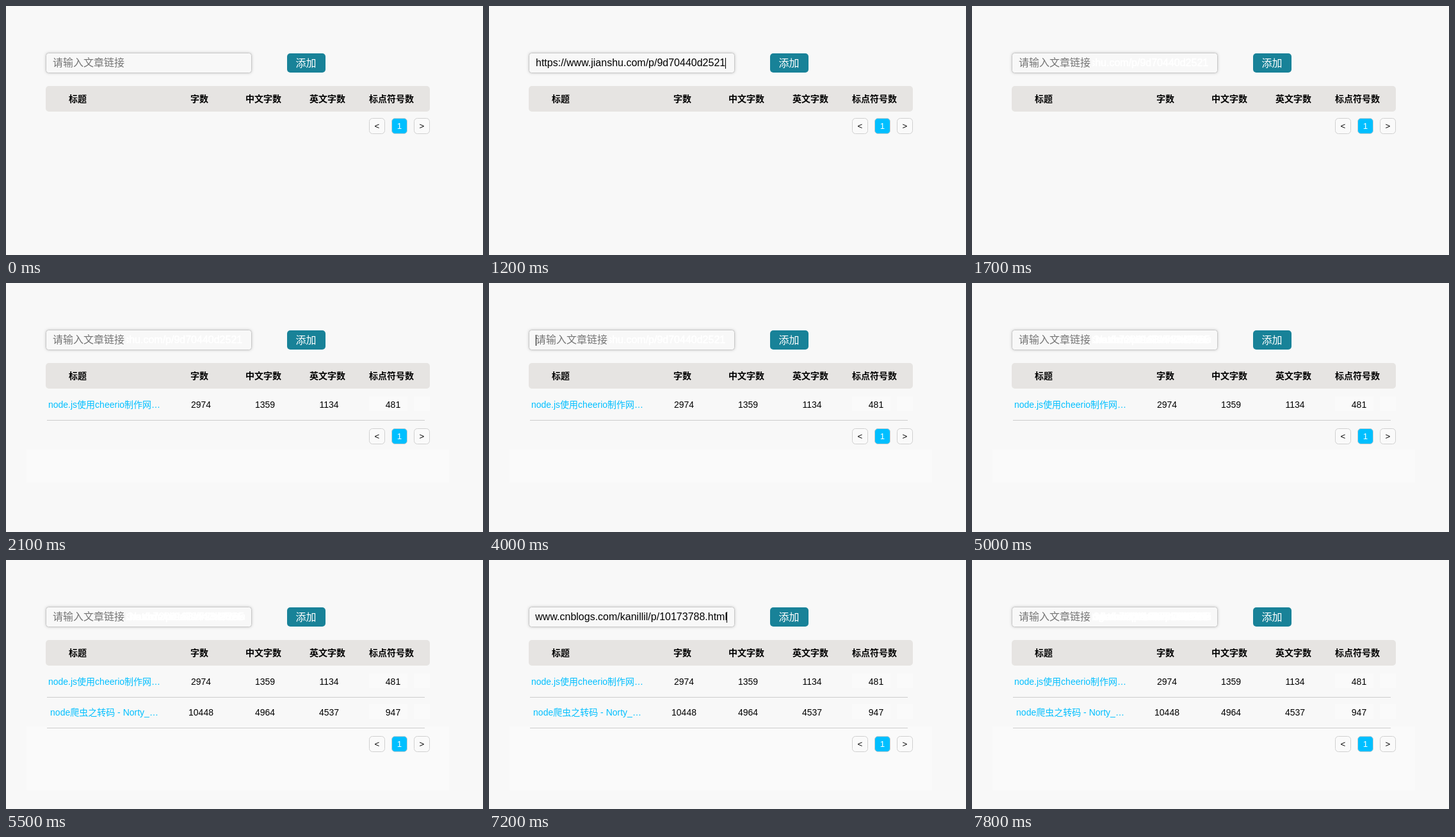
Animation of 745x389 px, one loop 8 s. Source, as an HTML page:

```html
<!DOCTYPE html>
<html lang="zh-CN">
<head>
<meta charset="utf-8">
<title>文章字数统计</title>
<style>
  html, body { margin: 0; width: 100%; height: 100%; overflow: hidden; background: #f8f8f8; }
  svg { display: block; width: 745px; height: 389px; }
  text { font-family: "Liberation Sans", Arial, "Noto Sans CJK SC", "Noto Sans CJK", sans-serif; font-size: 14px; white-space: pre; }
  .mid { text-anchor: middle; }
  .head { font-weight: bold; }
  .big { font-size: 16px; }
  .small { font-size: 13.33px; }
  .link { fill: #00bfff; }
  .ghost { fill: #fff; stroke: #fff; stroke-width: .7; }
  .field { filter: drop-shadow(0 0 2px rgba(0, 0, 0, .18)); }
</style>
</head>
<body>
<svg id="stage" viewBox="0 0 745 389">
  <defs>
    <clipPath id="inner"><rect x="72" y="76" width="301" height="26"/></clipPath>
    <clipPath id="tail"><rect x="188" y="76" width="185" height="26"/></clipPath>
  </defs>
</svg>
<script>
const LOOP = 8000;
const stage = document.getElementById('stage');

function add(parent, tag, attrs, content) {
  const el = document.createElementNS('http://www.w3.org/2000/svg', tag);
  for (const key in attrs) el.setAttribute(key, attrs[key]);
  if (content) el.textContent = content;
  parent.appendChild(el);
  return el;
}
const box = (parent, x, y, width, height, fill, more) =>
  add(parent, 'rect', { x, y, width, height, fill, ...more });
const label = (parent, x, y, cls, content, more) =>
  add(parent, 'text', { x, y, class: cls, ...more }, content);
const show = (el, on) => { el.style.display = on ? '' : 'none'; };

// start: pasted, blur: focus lost and scrolled home, end: cleared
const entries = [
  { url: 'https://www.jianshu.com/p/9d70440d2521', start: 1200, blur: 1600, end: 1700, caret: 369, fits: true },
  { url: 'https://blog.csdn.net/h7206183/article/details/72849265', start: 4200, blur: 4900, end: 5000, caret: 371 },
  { url: 'https://www.cnblogs.com/kanillil/p/10173788.html', start: 7200, blur: 7700, end: 7800, caret: 371 }
];
const rows = [
  { at: 2100, cells: ['node.js使用cheerio制作网…', '2974', '1359', '1134', '481'] },
  { at: 5500, cells: ['node爬虫之转码 - Norty_…', '10448', '4964', '4537', '947'] }
];
const carets = [[500, 1000], [4000, 4200], [7000, 7200]];
const columns = [153.5, 304.5, 404.5, 504.5, 604.5];

const panel = box(stage, 32, 260, 660, 52, '#fafafa');

// Link field
box(stage, 62.5, 73.5, 321, 31, '#f8f8f8', { rx: 4, stroke: '#c8c8c8', class: 'field' });
const ghosts = add(stage, 'g', { 'clip-path': 'url(#tail)' });
const hint = label(stage, 73, 94, 'big', '请输入文章链接', { fill: '#757575' });
const values = add(stage, 'g', { 'clip-path': 'url(#inner)' });
const caret = box(stage, 73, 81, 1, 17, '#000');

function place(parent, entry, home, cls) {
  const left = home || entry.fits;
  return label(parent, left ? 73 : 372, 94, cls, entry.url, { 'text-anchor': left ? 'start' : 'end' });
}
for (const e of entries) {
  e.active = place(values, e, false, 'big');
  e.idle = place(values, e, true, 'big');
  e.trace = add(ghosts, 'g', {});
  place(e.trace, e, false, 'big ghost');
  if (!e.fits) place(e.trace, e, true, 'big ghost');
}

// Button and table head
box(stage, 439, 74, 60, 30, '#188298', { rx: 5 });
label(stage, 468.5, 95, 'mid big', '添加', { fill: '#fff' });
box(stage, 62, 125, 600, 40, '#e6e4e2', { rx: 5 });
[['标题', 112], ['字数', 302], ['中文字数', 402], ['英文字数', 502], ['标点符号数', 602]]
  .forEach(([name, x]) => label(stage, x, 150, 'mid head', name));

// Table rows
rows.forEach((row, i) => {
  const g = row.el = add(stage, 'g', { transform: `translate(0 ${48 * i})` });
  box(g, 567, 177, 60, 23, '#fafafa');
  box(g, 637, 177, 25, 23, '#fafafa');
  row.cells.forEach((cell, c) => label(g, columns[c], 195, c ? 'mid' : 'mid link', cell));
  box(g, 64, 214, 590, 1, '#ccc');
});

// Pager
const pager = add(stage, 'g', {});
['<', '1', '>'].forEach((mark, i) => {
  const on = i === 1, x = 567 + 35 * i;
  box(pager, x + .5, .5, 24, 24, on ? '#00bfff' : '#fafafa', { rx: 5, stroke: '#d0d0d0' });
  label(pager, x + 12.5, 17, 'mid small', mark, { fill: on ? '#fff' : '#000' });
});

function draw(t) {
  const within = (a, b) => t >= a && t < b;
  let filled = false, caretX = carets.some(([a, b]) => within(a, b)) ? 73 : 0;
  for (const e of entries) {
    const active = within(e.start, e.blur), idle = within(e.blur, e.end);
    show(e.active, active);
    show(e.idle, idle);
    show(e.trace, t >= e.end);
    filled = filled || active || idle;
    if (active && t < e.start + 500) caretX = e.caret;
  }
  show(hint, !filled);
  show(ghosts, !filled);
  show(caret, caretX > 0);
  caret.setAttribute('x', caretX);

  const count = rows.filter(row => t >= row.at).length;
  rows.forEach((row, i) => show(row.el, i < count));
  show(panel, count > 0);
  panel.setAttribute('height', count > 1 ? 100 : 52);
  pager.setAttribute('transform', `translate(0 ${[175, 227, 275][count]})`);
}

const begin = performance.now();
function tick() {
  draw((performance.now() - begin) % LOOP);
  requestAnimationFrame(tick);
}
tick();
</script>
</body>
</html>
```
